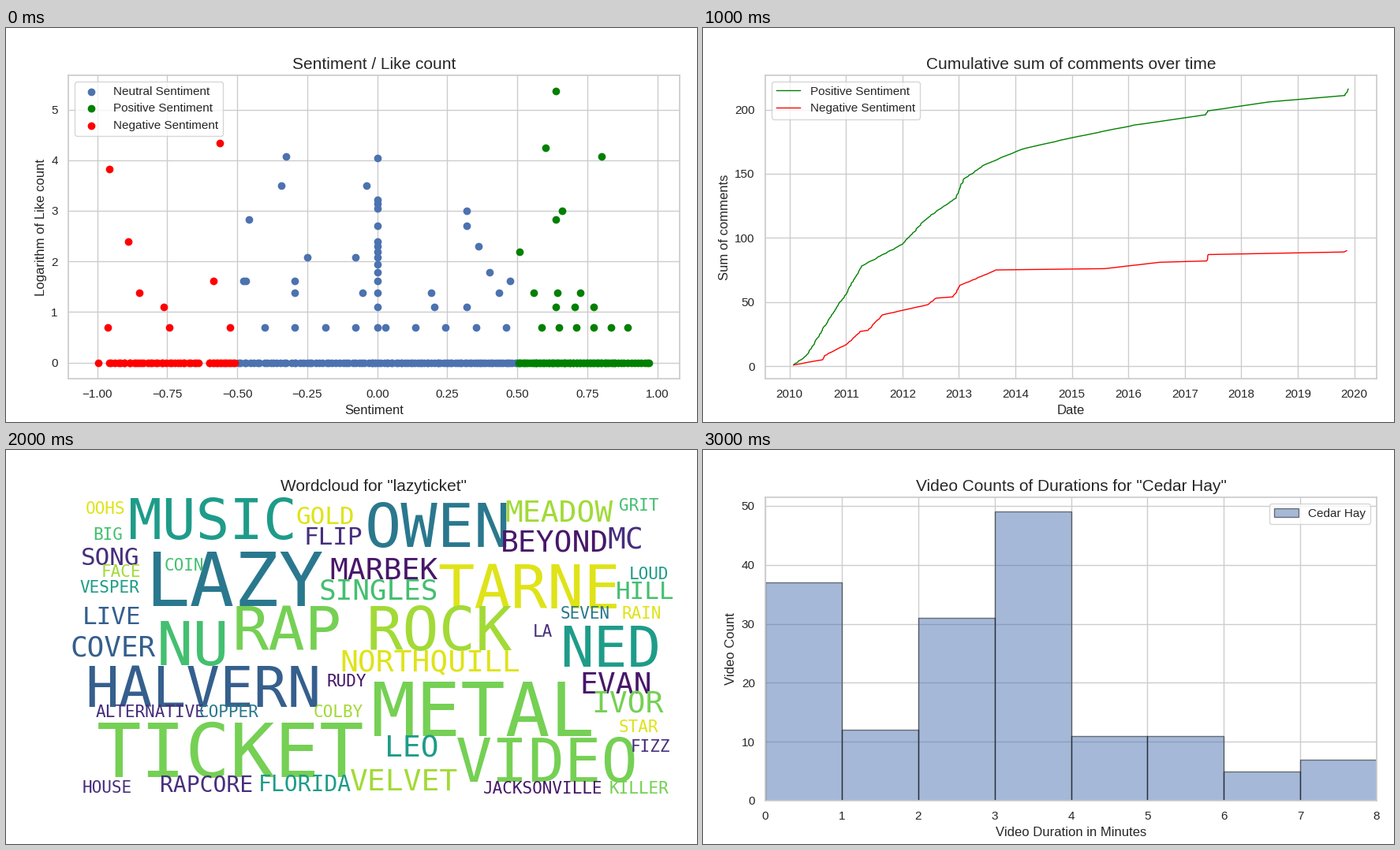
A matplotlib script for the animation above (4 s loop, 876 by 500 pixels).

```python
import matplotlib.pyplot as plt
import numpy as np
from matplotlib.animation import FuncAnimation

W, H, DPI = 876, 500, 100
LEFT, RIGHT, TOP, BOTTOM = 79, 854, 60, 445
INK, RULE, BLUE = "0.15", "0.8", "#4C72B0"

plt.rcParams.update({
    "font.family": "Liberation Sans", "font.size": 12,
    "text.color": INK, "axes.labelcolor": INK,
    "xtick.color": INK, "ytick.color": INK,
    "axes.edgecolor": RULE, "axes.linewidth": 1.25, "axes.axisbelow": True,
    "axes.grid": True, "grid.color": RULE, "grid.linewidth": 1,
    "axes.titlesize": 15, "axes.labelsize": 12,
    "xtick.labelsize": 11, "ytick.labelsize": 11, "legend.fontsize": 11,
    "xtick.major.size": 6, "ytick.major.size": 6,
    "xtick.bottom": False, "ytick.left": False,
    "lines.linewidth": 1.5, "lines.markersize": 6, "patch.linewidth": 1,
})

fig = plt.figure(figsize=(W / DPI, H / DPI), dpi=DPI, facecolor="white")

# Words strung evenly along straight lines: first and last centre in pixels
WORD_LINES = [
    ("MUSIC OWEN", (262, 113), (547, 123)),
    ("LAZY TARNE", (289, 198), (663, 201)),
    ("RAP ROCK", (356, 255), (549, 254)),
    ("NU NED", (237, 273), (766, 275)),
    ("HALVERN METAL", (250, 326), (605, 363)),
    ("TICKET VIDEO", (285, 415), (686, 421)),
    ("NORTHQUILL LEO", (538, 281), (514, 390)),
    ("OOHS BIG SONG", (126, 81), (132, 146)),
    ("VESPER LIVE COVER", (131, 181), (136, 261)),
    ("FACE COIN", (146, 161), (226, 153)),
    ("GOLD FLIP", (405, 94), (415, 120)),
    ("MARBEK SINGLES", (479, 164), (472, 189)),
    ("MEADOW BEYOND", (701, 91), (696, 129)),
    ("GRIT MC", (802, 77), (785, 126)),
    ("LOUD HILL RAIN", (815, 164), (806, 214)),
    ("SEVEN LA", (734, 214), (680, 237)),
    ("EVAN IVOR STAR FIZZ", (773, 309), (817, 383)),
    ("ALTERNATIVE COPPER", (183, 339), (282, 339)),
    ("RUDY COLBY", (432, 300), (421, 339)),
    ("HOUSE RAPCORE FLORIDA VELVET", (128, 435), (505, 432)),
    ("JACKSONVILLE KILLER", (681, 436), (803, 436)),
]
SMALL = 21
WORD_SIZES = {
    94: "LAZY METAL TICKET",
    77: "OWEN TARNE VIDEO NU RAP ROCK",
    71: "MUSIC HALVERN NED",
    38: "NORTHQUILL MARBEK MEADOW BEYOND MC EVAN IVOR LEO VELVET",
    36: "COVER SINGLES",
    31: "SONG LIVE GOLD FLIP HILL",
    28: "RAPCORE FLORIDA",
}
WORD_TONES = {
    .06: "EVAN MARBEK RUDY BEYOND JACKSONVILLE",
    .13: "SONG FLIP MC LA FIZZ ALTERNATIVE RAPCORE HOUSE",
    .30: "HALVERN LIVE COVER",
    .40: "LAZY OWEN SEVEN COPPER",
    .55: "MUSIC VESPER LOUD NED LEO FLORIDA",
    .70: "NU BIG COIN GRIT HILL SINGLES",
    .79: "VIDEO RAP IVOR KILLER METAL TICKET",
    .86: "ROCK MEADOW FACE COLBY VELVET",
    .95: "TARNE NORTHQUILL STAR RAIN GOLD OOHS",
}


def new_axes(title, xlabel="", ylabel=""):
    ax = fig.add_axes([LEFT / W, 1 - BOTTOM / H,
                       (RIGHT - LEFT) / W, (BOTTOM - TOP) / H],
                      label=title)
    ax.set_title(title)
    ax.set_xlabel(xlabel)
    ax.set_ylabel(ylabel)
    return ax


def spread(likes, start, end, count):
    """Comments with the same likes, evenly spaced over a sentiment range."""
    return [(x, likes) for x in np.linspace(start, end, count)]


def unliked(rng, start, end, count):
    """Comments without likes, jittered around even spacing."""
    jitter = rng.uniform(-.5, .5, count) * (end - start) / count
    x = np.clip(np.linspace(start, end, count) + jitter, start, end)
    return [(v, 1) for v in x]


def sentiment_chart():
    ax = new_axes("Sentiment / Like count", "Sentiment",
                  "Logarithm of Like count")
    rng = np.random.default_rng(4)
    neutral = [(-.326, 59), (-.343, 33), (-.038, 33), (-.459, 17), (.32, 20),
               (.32, 15), (.362, 10), (-.25, 8), (-.078, 8), (.402, 6)]
    neutral += [(0, n) for n in (*range(2, 12), 15, 21, 23, 25, 57)]
    neutral += (spread(2, -.402, .46, 9) + spread(3, .205, .32, 2)
                + spread(4, -.296, .435, 4) + spread(5, -.478, -.469, 2)
                + spread(5, -.296, .475, 2)
                + unliked(rng, -.5, -.02, 42) + unliked(rng, -.02, .5, 62))
    positive = [(.638, 215), (.601, 70), (.802, 59), (.66, 20), (.638, 17),
                (.508, 9)]
    positive += (spread(2, .587, .895, 6) + spread(3, .638, .773, 3)
                 + spread(4, .56, .726, 3)
                 + unliked(rng, .503, .85, 60) + unliked(rng, .86, .973, 11))
    negative = [(-.562, 77), (-.957, 46), (-.889, 11), (-.585, 5), (-.85, 4),
                (-.762, 3), (-.997, 1)]
    negative += (spread(2, -.962, -.526, 3) + unliked(rng, -.957, -.638, 34)
                 + unliked(rng, -.602, -.51, 15))
    for name, color, points in (("Neutral", BLUE, neutral),
                                ("Positive", "green", positive),
                                ("Negative", "red", negative)):
        x, likes = zip(*points)
        ax.scatter(x, np.log(likes), color=color, label=f"{name} Sentiment")
    ax.set_xlim(-1.1035, 1.0798)
    ax.set_ylim(-.3178, 5.679)
    ax.set_xticks(np.arange(-1, 1.01, .25))
    ax.set_yticks(range(6))
    ax.legend(loc="upper left")
    return ax


def comment_curve(knots, rng):
    """One step per comment, with irregular dates around the knots."""
    years, totals = zip(*knots)
    count = np.arange(1, totals[-1] + 1)
    dates = np.interp(count, totals, years) + rng.uniform(-.012, .012, len(count))
    return np.sort(np.clip(dates, years[0], years[-1])), count


def cumulative_chart():
    ax = new_axes("Cumulative sum of comments over time", "Date",
                  "Sum of comments")
    rng = np.random.default_rng(2)
    # (years since 2010, running total)
    gains = [(.07, 1), (.3, 8), (.745, 40), (1.01, 57), (1.275, 78), (2, 95),
             (2.42, 115), (2.94, 131), (3.09, 146), (3.455, 157), (4.1, 169),
             (4.99, 178), (6.12, 188), (7.37, 196), (7.41, 199), (8.5, 206),
             (9.825, 211), (9.906, 216)]
    losses = [(.07, 1), (.59, 5), (.605, 8), (1.02, 17), (1.25, 27),
              (1.39, 28), (1.65, 40), (2.46, 48), (2.59, 53), (2.9, 54),
              (3.02, 63), (3.665, 75), (5.58, 76), (6.57, 81), (7.395, 82),
              (7.41, 87), (9.81, 89), (9.867, 90)]
    for name, color, knots in (("Positive", "green", gains),
                               ("Negative", "red", losses)):
        ax.plot(*comment_curve(knots, rng), color=color, lw=1,
                label=f"{name} Sentiment")
    ax.set_xlim(-.429, 10.398)
    ax.set_ylim(-9.75, 226.75)
    ax.set_xticks(range(11), range(2010, 2021))
    ax.set_yticks(range(0, 201, 50))
    ax.legend(loc="upper left")
    return ax


def by_word(groups):
    return {word: key for key, words in groups.items()
            for word in words.split()}


def word_cloud():
    ax = new_axes('Wordcloud for "lazyticket"')
    ax.set_xlim(LEFT, RIGHT)
    ax.set_ylim(BOTTOM, TOP)
    ax.axis("off")
    sizes, tones = by_word(WORD_SIZES), by_word(WORD_TONES)
    for line, first, last in WORD_LINES:
        words = line.split()
        for word, (x, y) in zip(words, np.linspace(first, last, len(words))):
            ax.text(x, y, word, ha="center", va="baseline",
                    family="DejaVu Sans Mono",
                    size=sizes.get(word, SMALL) * 72 / DPI,
                    color=plt.cm.viridis(tones[word]))
    return ax


def duration_chart():
    ax = new_axes('Video Counts of Durations for "Cedar Hay"',
                  "Video Duration in Minutes", "Video Count")
    counts = [37, 12, 31, 49, 11, 11, 5, 7]
    ax.bar(range(8), counts, width=1, align="edge", color=BLUE,
           edgecolor="black", alpha=.5, label="Cedar Hay")
    ax.set_xlim(0, 8)
    ax.set_ylim(0, max(counts) * 1.05)
    ax.set_xticks(range(9))
    ax.set_yticks(range(0, 51, 10))
    ax.legend(loc="upper right")
    return ax


slides = [sentiment_chart(), cumulative_chart(), word_cloud(), duration_chart()]


def show_slide(index):
    for i, ax in enumerate(slides):
        ax.set_visible(i == index)
    return slides


anim = FuncAnimation(fig, show_slide, frames=len(slides), interval=1000,
                     repeat=True, repeat_delay=0, blit=False)
plt.show()
```
